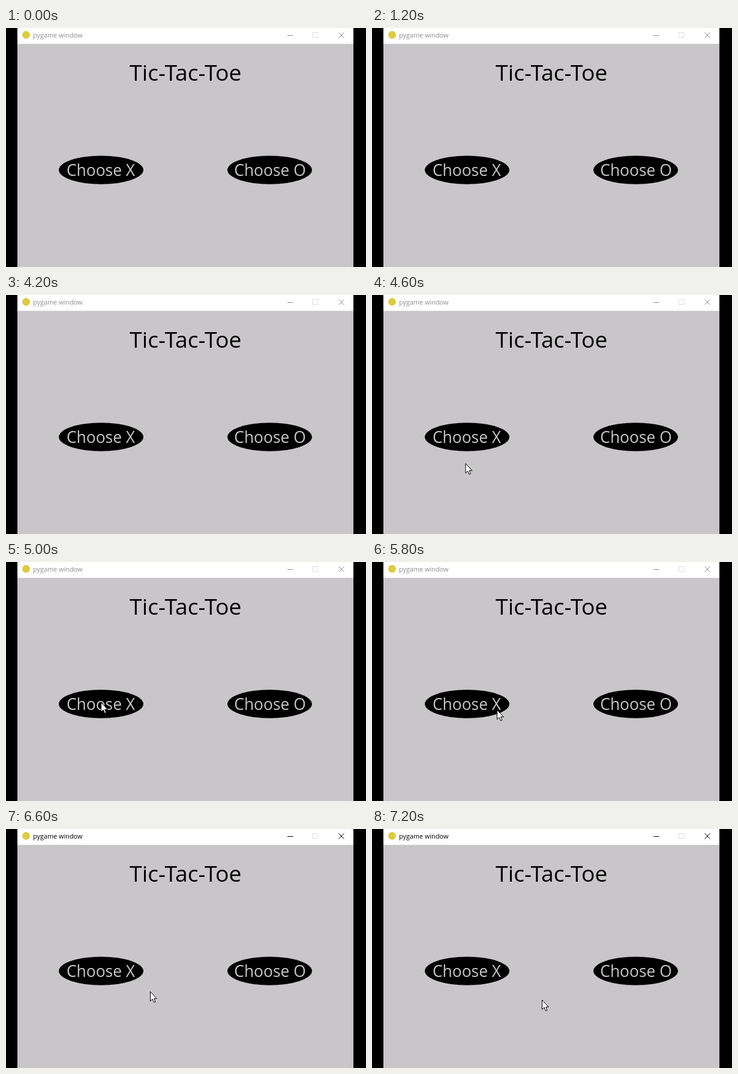
An HTML page for the animation above (8000 ms loop, 600x399 px).

```html
<!DOCTYPE html>
<html lang="en">
<head>
<meta charset="utf-8">
<title>Tic-Tac-Toe</title>
<style>
  html, body { margin: 0; width: 100%; height: 100%; overflow: hidden; background: #000; }
  svg { display: block; width: 100%; height: 100%; }
  text { font-family: "Open Sans", sans-serif; }
  .center { text-anchor: middle; }
  .label { font-size: 26.4px; fill: #c8c6c8; }
  #bar { color: #8c8c8c; }
  #bar.active { color: #000; }
</style>
</head>
<body>
<svg viewBox="0 0 600 399">
  <rect x="19" width="560" height="399" fill="#c8c6c8"/>
  <g id="bar">
    <rect x="19" width="560" height="26.5" fill="#fff"/>
    <circle cx="33.5" cy="11.5" r="6.5" fill="#dccb45"/>
    <text x="45" y="16" font-size="10.9" fill="currentColor">pygame window</text>
    <g fill="none" stroke="currentColor">
      <path d="M469 12.5h9.5"/>
      <rect x="511.5" y="7.5" width="8.5" height="8.5" stroke="#dedede"/>
      <path d="M554.5 7.5l9 9m0-9l-9 9"/>
    </g>
  </g>
  <text class="center" x="299.3" y="88" font-size="37.3">Tic-Tac-Toe</text>
  <ellipse cx="158.5" cy="237" rx="70.5" ry="23.7"/>
  <text class="center label" x="158" y="246.7">Choose X</text>
  <ellipse cx="439.5" cy="237" rx="70.5" ry="23.7"/>
  <text class="center label" x="440" y="246.7">Choose O</text>
  <path id="cursor" d="M0 0V15.8L3.6 12.4L6 18L8.4 17L6.1 11.6H10.9Z" fill="#fff" stroke="#000" visibility="hidden"/>
</svg>
<script>
  const LOOP = 8000, FOCUS_AT = 6400;
  const stops = [
    [4400, 217.5, 342.5], [4600, 156, 281.5], [4800, 155.5, 277.5],
    [5000, 158.5, 234.5], [5800, 208.5, 247], [6000, 180.5, 243],
    [6200, 176.5, 241.5], [6600, 240.5, 271.5], [7000, 283.5, 285.5]
  ];
  const bar = document.getElementById("bar");
  const cursor = document.getElementById("cursor");
  const start = performance.now();

  function draw() {
    const t = (performance.now() - start) % LOOP;
    const stop = stops.filter(([from]) => from <= t).pop();
    bar.classList.toggle("active", t >= FOCUS_AT);
    cursor.setAttribute("visibility", stop ? "visible" : "hidden");
    if (stop) cursor.setAttribute("transform", `translate(${stop[1]} ${stop[2]})`);
    requestAnimationFrame(draw);
  }
  draw();
</script>
</body>
</html>
```
